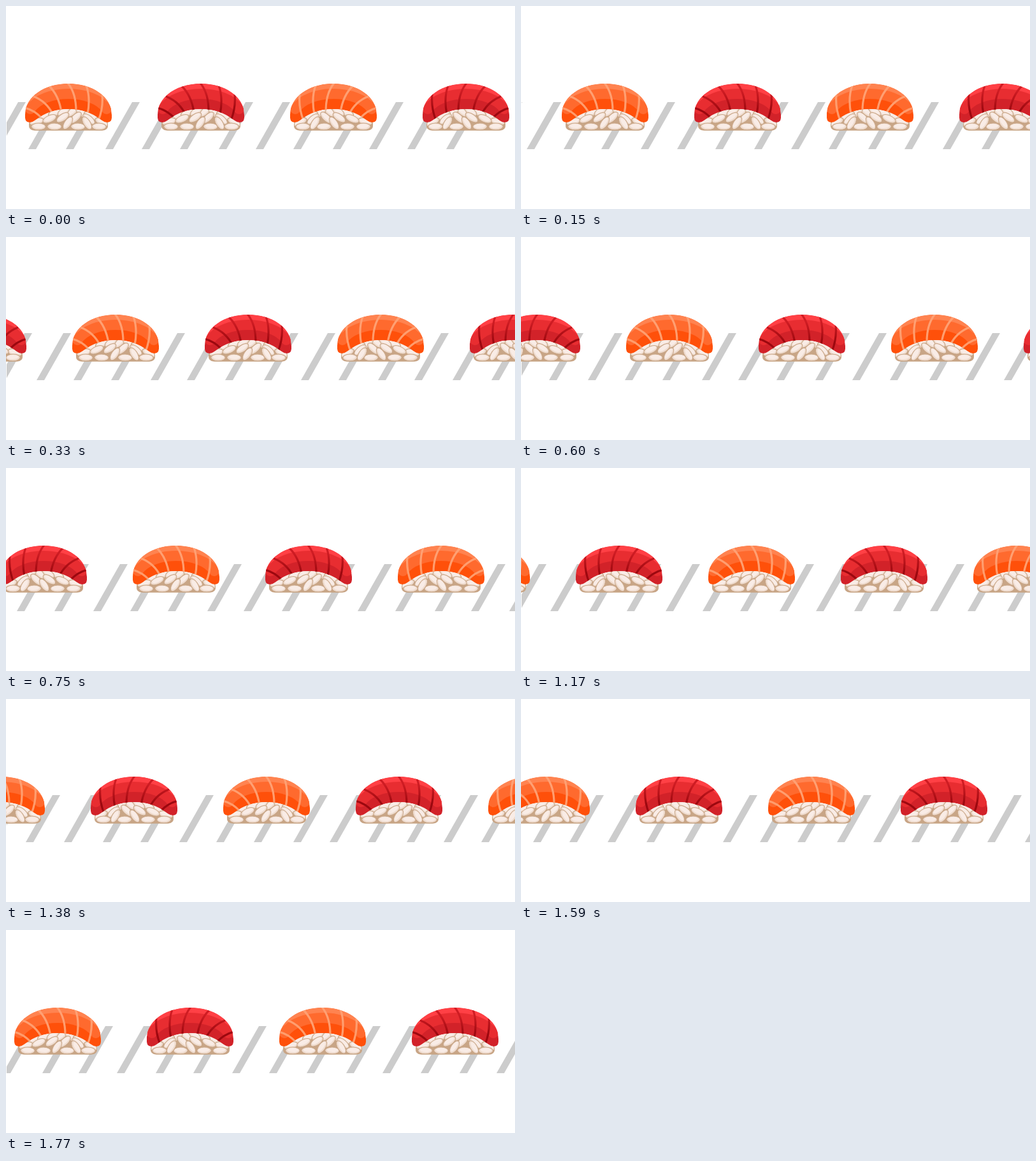
An HTML page for the animation above (1800 ms loop, 799x319 px).

```html
<!DOCTYPE html>
<html lang="en">
<head>
<meta charset="utf-8">
<title>Sushi belt</title>
<style>
  html, body { margin: 0; width: 100%; height: 100%; overflow: hidden; background: #fff; }
  svg { display: block; width: 799px; height: 319px; }
</style>
</head>
<body>
<svg viewBox="0 0 799 319">
  <defs>
    <clipPath id="beltClip"><rect x="1" y="151" width="798" height="74"/></clipPath>
    <path id="fish" d="M0 49C0 20 31 0 68 0S136 20 136 49V54Q136 61 129 61Q125 61 120 57.500C104 45 87 40 68 40S32 45 16 57.500Q11 61 7 61Q0 61 0 54Z"/>
    <path id="bed" d="M6 65Q6 58 14 55L30 43Q68 28 106 43L122 55Q130 58 130 65Q130 73.500 121 73.500H15Q6 73.500 6 65Z"/>
    <clipPath id="fishClip"><use href="#fish"/></clipPath>
    <clipPath id="bedClip"><use href="#bed"/></clipPath>
    <g id="rice"></g>
  </defs>
  <g clip-path="url(#beltClip)"><g id="belt" fill="#ccc"></g></g>
  <g id="plates"></g>
</svg>
<script>
  const LOOP = 1800, STEP = 30;
  const BELT_SPEED = 6.41, SUSHI_SPEED = 6.764; // px per step
  const GAP = 208, WIDTH = 136;
  const get = id => document.getElementById(id);
  const repeat = (n, make) => Array.from({ length: n }, (_, i) => make(i)).join('');

  // Two lengths of slanted bars; every third pair sits slightly wider
  const bar = x => `<path d="M${x} 225h12l42-74h-12z"/>`;
  const bars = from => repeat(14, i => bar(from + Math.floor(59.5 * i) + (i % 3 === 1 ? 2 : 0)));
  get('belt').innerHTML = bars(-918) + bars(-84);

  const grain = (x, y, tilt) => `<g transform="translate(${x} ${y}) rotate(${tilt})">
    <ellipse rx="11.3" ry="5.4" fill="#efdccf" stroke="#c8a586"/>
    <ellipse cx=".5" cy="-.8" rx="9" ry="3.4" fill="#f9ece6"/></g>`;

  // Six grains along an arch, the last two leaning the other way
  const archRow = (left, gap, top, spread) => repeat(6, i => {
    const x = left + gap * i;
    const y = top + ((x - WIDTH / 2) / spread) ** 2;
    return grain(x, y, i < 4 ? -14 - 10 * i : 100 - 15 * i);
  });
  const floorRow = [21, 46, 83, 116].map(x => grain(x, 67.5, 1)).join('');

  get('rice').innerHTML = `<use href="#bed" fill="#c8a586"/>
    <g clip-path="url(#bedClip)">
      ${archRow(33, 14, 43, 13)}
      ${archRow(18, 20.5, 53, 19.5)}
      ${floorRow}${grain(67, 62, -56)}${grain(97, 62, 58)}
      <use href="#bed" fill="none" stroke="#c8a586" stroke-width="2"/>
    </g>`;

  const cuts = 'M0 38Q15 42 26 54M13 20Q34 28 44 49M37 3Q53 18 57 45' +
    'M67 -1Q80 15 80 43M96 3Q103 22 98 48M121 17Q123 38 115 58';
  const arch = 'M8 40C30 8 106 8 128 40';

  function addFish(id, [low, mid, high, cutTop, cutLow]) {
    get('rice').insertAdjacentHTML('afterend', `
      <linearGradient id="${id}Cut" gradientUnits="userSpaceOnUse" x1="0" y1="12" x2="0" y2="42">
        <stop offset="0" stop-color="${cutTop}"/><stop offset="1" stop-color="${cutLow}"/>
      </linearGradient>
      <g id="${id}"><use href="#rice"/>
        <g clip-path="url(#fishClip)">
          <use href="#fish" fill="${low}"/>
          <path d="${arch}H142V-5H-6V40Z" fill="${high}"/>
          <path d="${arch}" fill="none" stroke="${mid}" stroke-width="16" stroke-linecap="round"/>
          <path d="${cuts}" fill="none" stroke="url(#${id}Cut)" stroke-width="3.2"/>
        </g>
      </g>`);
  }
  addFish('salmon', ['#ff500a', '#ff6a2e', '#ff8350', '#ffa073', '#ff9c6c']);
  addFish('tuna', ['#d22229', '#e82d31', '#ff4045', '#cf1c23', '#9c080f']);

  // Kinds alternate; some pieces face the other way
  const mirrored = i => i === 1 || i > 3;
  get('plates').innerHTML = repeat(6, i => {
    const x = 30 + (i - 2) * GAP;
    const place = mirrored(i) ? `translate(${x + WIDTH} 122) scale(-1 1)` : `translate(${x} 122)`;
    return `<use href="#${i % 2 ? 'tuna' : 'salmon'}" transform="${place}"/>`;
  });

  const slide = (id, x) => get(id).setAttribute('transform', `translate(${Math.round(x)} 0)`);
  const start = performance.now();
  function draw(now) {
    const step = Math.floor((Math.max(0, now - start) % LOOP) / STEP);
    slide('belt', step * BELT_SPEED);
    slide('plates', step * SUSHI_SPEED);
    requestAnimationFrame(draw);
  }
  draw(start);
</script>
</body>
</html>
```
